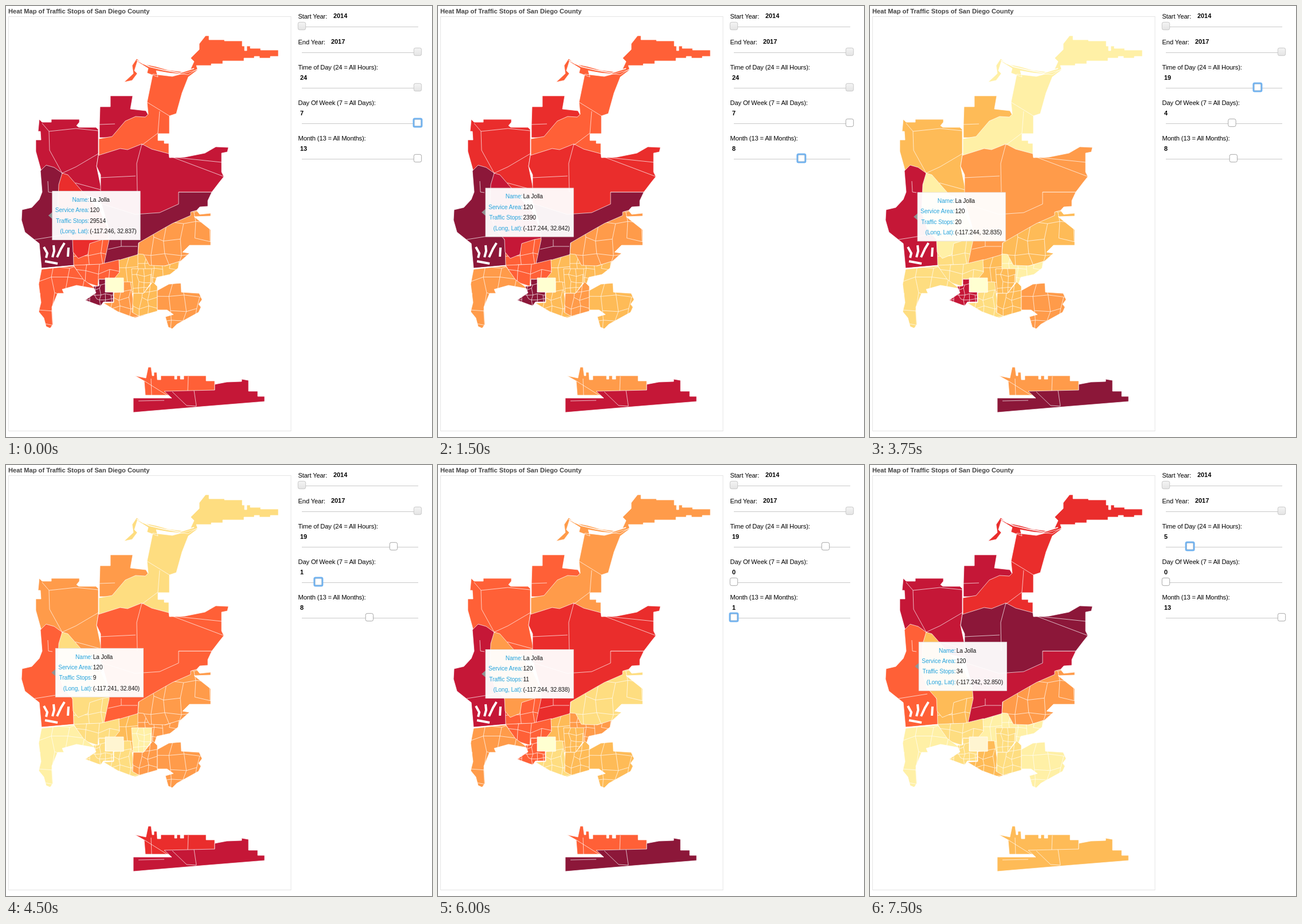
An HTML page that plays this animation: 743x753 px, repeating every 8 s.

```html
<!DOCTYPE html>
<html lang="en">
<head>
<meta charset="utf-8">
<title>Heat Map</title>
<style>
  html, body { margin: 0; width: 100%; height: 100%; overflow: hidden; background: #fff; }
  svg { display: block; width: 100vw; height: 100vh; }
  text { font-family: "Liberation Sans", Arial, sans-serif; font-size: 11.2px; letter-spacing: -.15px; }
  .bold { font-weight: bold; font-size: 10.9px; letter-spacing: 0; }
  .title { font-weight: bold; font-size: 11.15px; letter-spacing: 0; fill: #444; }
  .tip text { font-size: 10.2px; letter-spacing: -.1px; fill: #111; }
  .tip .key { fill: #26a4dc; text-anchor: end; }
  .border { fill: none; stroke: #fff; stroke-width: .7; }
</style>
</head>
<body>
<svg id="stage" viewBox="0 0 743 753"></svg>
<script>
const STEP = 750, LOOP = 8000;
const PALETTE = ['#ffffd1', '#fff0a6', '#fedd80', '#febb57', '#ff9b4a', '#ff6037',
  '#ea2d2c', '#c51737', '#8c1739', '#fff5d1'];

// Painted in order, so each area only needs the edges that stay visible.
// heat: palette index per step; cell: size of its inner districts
const AREAS = [
  { name: 'north-west', heat: '76643345567', d: 'M58,198 63,203H79V198H128V203L123,209 127,212H157L161,216V261L158,280 170,338 90,320 62,290 52,254V234H61L60,219H56ZM163,207 164,176H182V157H221L217,180 244,183 248,190 220,230H163Z' },
  { name: 'north-east', heat: '54533121446', d: 'M337,66 348,52H354V59H381V61H412V70H416V78H420V70H426V74H444V77H475V88H461V91H442V88H433V91H415V96H378V101H358V104H332L334,110 318,120 285,117 262,113 265,124 246,117 248,109 229,97 224,113 229,118 220,130 206,133 222,118 220,104 228,92 238,101 262,106 283,112 308,115 322,110 328,97 322,91 337,76ZM256,119 290,123 335,111 318,124 307,152 297,188 285,192V223H265V235H276V240H284V262H162V232L185,228 208,201 226,193 243,194 248,189 246,168Z' },
  { name: 'mesa', heat: '55522222553', cell: 27, d: 'M115,405H185L171,452 140,452 118,456Z' },
  { name: 'coast', heat: '87887754765', d: 'M70,278 84,282 98,292 105,390 117,410 118,453 62,458 58,415 33,395 27,374 28,356 45,352 58,338 63,325 60,288Z' },
  { name: 'canyon', heat: '66782123443', d: 'M98,292 108,295 128,318 165,360 185,405 168,408 146,415 143,434 126,441 117,430 116,408 100,390 90,360 92,312Z' },
  { name: 'foothills', heat: '88844455667', d: 'M290,325H359L352,340V350L338,351 319,372 240,425 229,438 200,446 171,450 180,408 178,385 165,340Z' },
  { name: 'central', heat: '76644456668', d: 'M161,261 199,249 212,251 237,241 254,250 284,258 285,265 312,264 347,257 366,246 388,247 386,255 376,257V290L380,298 372,308 359,325H301V346L268,361 225,364 165,345V295L158,280Z' },
  { name: 'valley', heat: '55522222552', cell: 21, d: 'M118,453 165,451 198,443V478H162L160,490 135,482Z' },
  { name: 'peninsula', heat: '54412211441', cell: 25, d: 'M62,460 118,454 135,478 157,494 123,488 98,495 101,502H90L80,526 82,556 77,563 70,560 66,545 57,534 61,518 57,486Z' },
  { name: 'lakes', heat: '44423345224', cell: 25, d: 'M231,414 262,396 290,380 322,366V360L332,357 338,364 357,362V367L328,368 357,391V418H320L308,430 320,432 303,447 262,458 236,450 230,434Z' },
  { name: 'heights', heat: '33323334331', cell: 23, d: 'M197,444 231,434 238,470 222,502H200L189,476 198,465Z' },
  { name: 'college', heat: '33311145451', cell: 14, d: 'M230,433 240,434 250,453 278,454 303,446 300,458 286,469 263,474 259,486 240,480 230,460Z' },
  { name: 'uptown', heat: '33313319332', cell: 11, d: 'M219,459H254V482L240,502H222Z' },
  { name: 'harbour', heat: '43312223223', cell: 15, d: 'M188,500H205V482H217L225,535 242,540 225,545 195,534 170,519 188,518Z' },
  { name: 'south-east', heat: '33423345332', cell: 15, d: 'M222,502H240L256,482 264,490V533L232,542 220,535Z' },
  { name: 'park', heat: '00090099009', d: 'M173,475H205V500H174Z' },
  { name: 'downtown', heat: '88847721552', cell: 9, d: 'M162,477H173V500H187V517H170L165,524 138,514 157,501 152,490 162,489Z' },
  { name: 'hills', heat: '43324444331', cell: 23, d: 'M264,497 284,486 305,484 306,500 337,502 342,513 336,521 340,526 336,535 298,556 290,564 283,561 278,543 292,539 281,531H264Z' },
  { name: 'border-north', heat: '53434468553', d: 'M225,646 244,650 248,631H253L255,646H258V640H263L264,653H270V646H294V652H298V646H304V652H310V646H349V655H364V680H243L241,655Z' },
  { name: 'border-south', heat: '77757876883', d: 'M222,685H289L276,673 364,671V661L385,657 411,656V652L423,654V673H439V682H451V691L340,700 222,710Z' }
];

const BORDERS = 'M63,205 75,219 122,214 161,218M75,219 76,252 98,292 122,281 161,258M121,309 165,321' +
  'M163,207 190,206M164,300 226,297M237,241 228,275 229,325M290,264 376,273M290,264 380,298' +
  'M246,168 285,192M268,184 265,222 237,243M73,306 74,325 81,326M50,408 100,400M201,408V420L178,425M201,420H229' +
  'M241,655 289,685M253,651 254,683M318,647 317,672M231,690 276,689M290,674 315,698 332,699 328,672';
const WATER = 'M66,421 72,432 70,440M83,418 84,428 81,439M102,414 96,424 89,439M109,422 108,438M68,446 90,450';

// One slider moves at each step
const MOVES = [['day', 7], ['month', 12], ['month', 8], ['day', 6], ['day', 4], ['hour', 19],
  ['day', 1], ['day', 0], ['month', 1], ['month', 13], ['hour', 5]];
const STOPS = [29514, 2218, 2390, 406, 352, 20, 9, 5, 11, 117, 34];
// Pointer position per step, in thousandths of a degree
const LON = [246, 245, 244, 250, 247, 244, 241, 238, 244, 249, 242];
const LAT = [837, 839, 842, 830, 833, 835, 840, 845, 838, 830, 850];

const SVG = 'http://www.w3.org/2000/svg';
const stage = document.getElementById('stage');

function set(node, attrs) {
  for (const k in attrs) node.setAttribute(k, attrs[k]);
  return node;
}
function add(parent, tag, attrs, text) {
  const node = parent.appendChild(set(document.createElementNS(SVG, tag), attrs));
  if (text !== undefined) node.textContent = text;
  return node;
}
function noise(a, b, c) {
  const v = Math.sin(a * 127.1 + b * 311.7 + c * 74.7) * 43758.5453;
  return v - Math.floor(v);
}

// Irregular grid of districts, clipped to its area
function districts({ name, d, cell }, shape) {
  const box = shape.getBBox();
  const cols = Math.ceil(box.width / cell), rows = Math.ceil(box.height / cell);
  const point = (i, j) => [
    box.x + (i + .45 * (noise(i, j, cell) - .5)) * cell,
    box.y + (j + .45 * (noise(j, i, cell + 1) - .5)) * cell
  ];
  let lines = '';
  for (let i = 0; i <= cols; i++) {
    for (let j = 0; j <= rows; j++) {
      if (noise(i, j, 5) < .85) lines += `M${point(i, j)} ${point(i + 1, j)}`;
      if (noise(i, j, 9) < .85) lines += `M${point(i, j)} ${point(i, j + 1)}`;
    }
  }
  add(add(stage, 'clipPath', { id: name }), 'path', { d });
  add(stage, 'path', { d: lines, class: 'border', 'clip-path': `url(#${name})` });
}

add(stage, 'rect', { width: 743, height: 753, fill: '#fff' });
add(stage, 'rect', { x: 4.5, y: 18.5, width: 492.5, height: 724, fill: 'none', stroke: '#e4e4e4' });
add(stage, 'text', { x: 4, y: 13, class: 'title' }, 'Heat Map of Traffic Stops of San Diego County');

const shapes = AREAS.map(area => {
  const shape = add(stage, 'path', { d: area.d, stroke: '#fff', 'stroke-width': .7 });
  if (area.cell) districts(area, shape);
  return shape;
});
add(stage, 'path', { d: BORDERS, class: 'border' });
add(stage, 'path', { d: WATER, class: 'border', style: 'stroke-width: 4' });
add(stage, 'path', { d: 'M61,458.6 118,453.6M228,95 250,106 275,112 303,117 328,109', class: 'border', style: 'stroke-width: 1.4' });

const grey = add(add(stage, 'defs', {}), 'linearGradient', { id: 'grey', x2: 0, y2: 1 });
add(grey, 'stop', { offset: 0, 'stop-color': '#f4f4f4' });
add(grey, 'stop', { offset: 1, 'stop-color': '#e4e4e4' });

function slider(label, y, min, max, valueX = 513, valueY = y - 13) {
  add(stage, 'text', { x: 509.5, y: y - 31.5 }, label);
  const value = add(stage, 'text', { x: valueX, y: valueY, class: 'bold' });
  add(stage, 'path', { d: `M516,${y + 1.5}H719`, stroke: '#c9c9c9' });
  const glow = add(stage, 'rect', { y: y - 8.5, width: 17, height: 17, rx: 3.5, fill: '#72b3f0' });
  const knob = add(stage, 'rect', {});
  return (number, look) => {
    const x = 516 + 202 * (number - min) / (max - min);
    const focused = look === 'focus', r = focused ? 5.7 : 6.7;
    value.textContent = number;
    set(glow, { x: x - 8.5, visibility: focused ? 'visible' : 'hidden' });
    set(knob, {
      x: x - r, y: y - r, width: 2 * r, height: 2 * r, rx: focused ? 1.5 : 3,
      fill: look === 'grey' ? 'url(#grey)' : '#fff',
      stroke: focused ? '#8fa9c2' : look === 'grey' ? '#c8c8c8' : '#a8a8a8',
      'stroke-width': focused ? .6 : 1
    });
  };
}

const yearText = (label, y) => add(stage, 'text', { x: 509.5, y }, label);
yearText('Start Year:', 21.5);
slider('', 35, 2014, 2017, 571, 20.5)(2014, 'grey');
yearText('End Year:', 66.5);
slider('', 80, 2014, 2017, 567, 65.5)(2017, 'grey');
const sliders = {
  hour: slider('Time of Day (24 = All Hours):', 142, 0, 24),
  day: slider('Day Of Week (7 = All Days):', 204, 0, 7),
  month: slider('Month (13 = All Months):', 266, 1, 13)
};

const tip = add(stage, 'g', { class: 'tip' });
add(tip, 'path', { d: 'M-7,42.5 0,36.5V48.5Z', fill: '#909090' });
add(tip, 'rect', { width: 153.3, height: 85, fill: '#fff', 'fill-opacity': .95, stroke: '#e3e0e0', 'stroke-width': .8 });
const rows = ['Name:', 'Service Area:', 'Traffic Stops:', '(Long, Lat):'].map((key, i) => {
  const y = 18.3 + 18.4 * i;
  add(tip, 'text', { x: 64.3, y, class: 'key' }, key);
  return add(tip, 'text', { x: 65.5, y });
});

function draw(step) {
  shapes.forEach((s, i) => s.setAttribute('fill', PALETTE[AREAS[i].heat[step]]));

  const past = MOVES.slice(0, step + 1);
  const values = { hour: 24, day: 7, month: 13, ...Object.fromEntries(past) };
  const touched = past.some(([name]) => name === 'hour');
  for (const name in sliders) {
    const look = name === MOVES[step][0] ? 'focus' : name === 'hour' && !touched ? 'grey' : 'plain';
    sliders[name](values[name], look);
  }

  const lon = LON[step], lat = LAT[step];
  ['La Jolla', 120, STOPS[step], `(-117.${lon}, 32.${lat})`].forEach((v, i) => rows[i].textContent = v);
  set(tip, { transform: `translate(${80.8 + (246 - lon) * 1.1} ${331.3 - (lat - 830) * 1.1})` });
}

let shown = -1;
const start = performance.now();
function tick(now) {
  const step = Math.floor(Math.max(0, now - start) % LOOP / STEP);
  if (step !== shown) draw(shown = step);
  requestAnimationFrame(tick);
}
tick(start);
</script>
</body>
</html>
```
